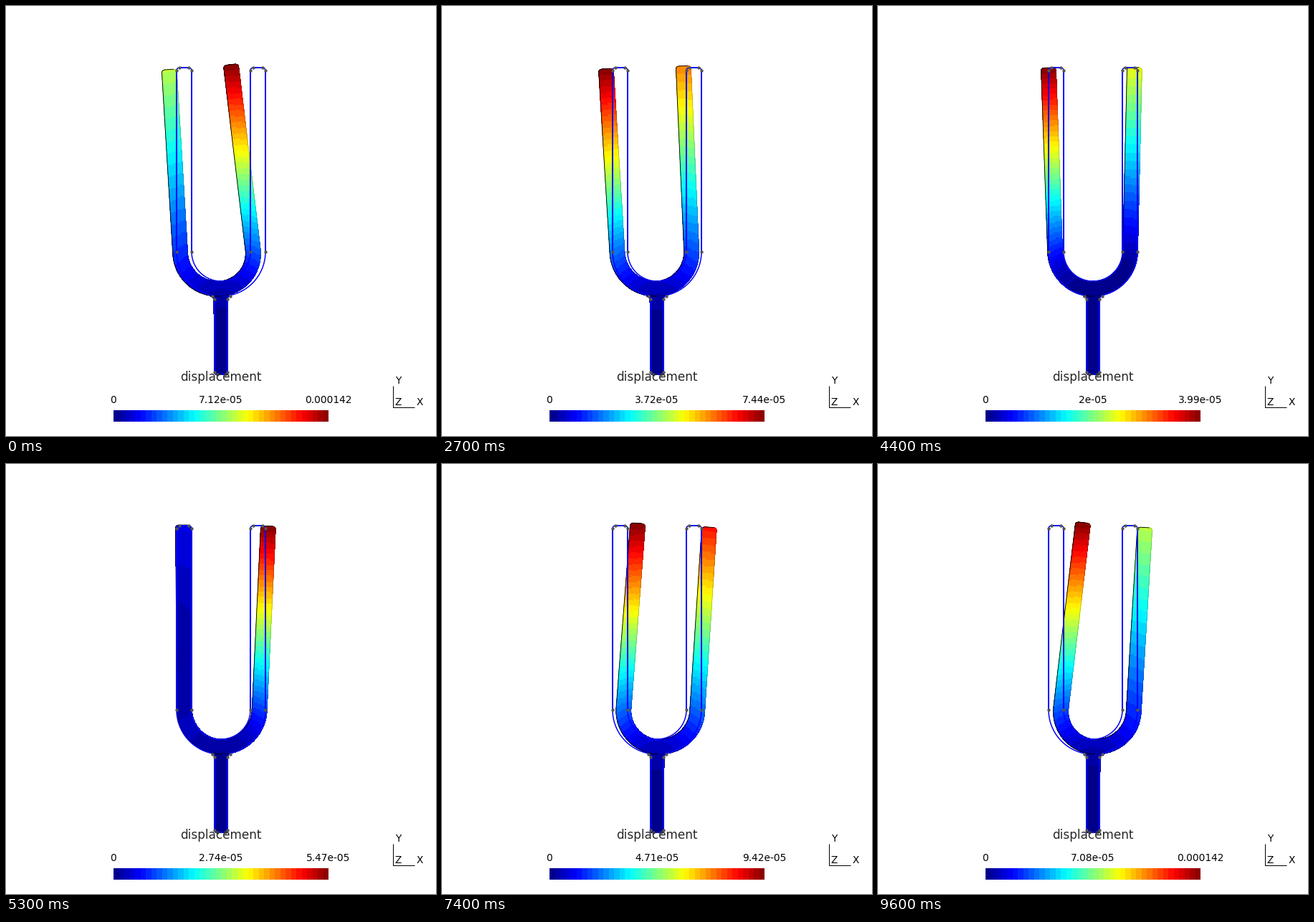
These frames come from a looping animation (600x600 px, 9700 ms). A matplotlib script:

```python
import numpy as np
import matplotlib.pyplot as plt
from matplotlib.animation import FuncAnimation
from matplotlib.collections import PolyCollection
from matplotlib.patches import Rectangle

SIZE, FRAMES, STEP = 600, 97, 100
PT = 0.72                      # points per pixel at 100 dpi
BANDS = 40
CX, CY = 300, 343              # centre of the bend
R_IN, R_OUT = 41, 62
R_MID, HALF = 51.5, 10.5
TIP, CORNER = 85.5, 4.2
STEM_HALF, STEM_END = 9.3, 515

# peak displacement read at a few moments
KEYS = [0, 18, 35, 53, 65, 74, 96]
PEAKS = np.array([14.24, 9.78, 6.32, 5.47, 7.57, 9.42, 14.16]) * 1e-5

plt.rcParams["font.family"] = "DejaVu Sans"
fig = plt.figure(figsize=(SIZE / 100, SIZE / 100), dpi=100, facecolor="white")
ax = fig.add_axes([0, 0, 1, 1])
ax.set_xlim(0, SIZE)
ax.set_ylim(SIZE, 0)
ax.axis("off")


def jet(level):
    """Banded blue-cyan-yellow-red ramp."""
    band = np.clip(np.floor(np.asarray(level) * BANDS), 0, BANDS - 1)
    s = 4 * (band + 0.5) / BANDS
    return np.clip(np.stack([1.5 - abs(s - c) for c in (3, 2, 1)], -1), 0, 1)


def round_inset(dist, radius):
    """How far an edge draws in at a distance from a rounded end."""
    d = np.clip(radius - dist, 0, radius)
    return radius - np.sqrt(radius ** 2 - d ** 2)


def integrate(omega, centre, start):
    """Displacement of a centre line whose sections rotate by omega."""
    step = np.diff(centre, axis=0)
    mid = (omega[1:] + omega[:-1])[:, None] / 2
    du = mid * np.stack([-step[:, 1], step[:, 0]], -1)
    return np.vstack([[start, 0], np.cumsum(du, axis=0) + [start, 0]])


def arm(side):
    """Rest grid of one prong and its lean and spread mode shapes."""
    phi = np.linspace(0, np.pi / 2, 45)
    ys = np.concatenate([np.linspace(CY, 91, 110)[1:], np.linspace(91, TIP, 9)[1:]])
    bend = np.stack([CX + side * R_MID * np.sin(phi), CY + R_MID * np.cos(phi)], -1)
    rod = np.stack([np.full_like(ys, CX + side * R_MID), ys], -1)
    centre = np.vstack([bend, rod])
    phi = np.concatenate([phi, np.full_like(ys, np.pi / 2)])
    normal = np.stack([side * np.sin(phi), np.cos(phi)], -1)

    half = np.full(len(phi), HALF)
    half[-len(ys):] -= round_inset(ys - TIP, CORNER)
    v = np.linspace(-1, 1, 8)
    offset = half[:, None, None] * v[None, :, None] * normal[:, None, :]
    turn = np.stack([-offset[..., 1], offset[..., 0]], -1)

    def mode(omega, start):
        shift = integrate(omega, centre, start)
        return shift[:, None, :] + omega[:, None, None] * turn

    lean = mode((0.045 + 0.045 * np.sin(phi)) / 29.4, 2 / 29.4)
    spread = mode(side * 0.0295 * np.sin(phi) ** 3 / 8.5, 0)
    return centre[:, None, :] + offset, lean, spread


def stem():
    ys = np.concatenate([np.linspace(399, 410, 12), np.linspace(411, 509, 30),
                         np.linspace(510, STEM_END, 9)])
    half = STEM_HALF - round_inset(STEM_END - ys, 4) + round_inset(ys - 405, 4)
    v = np.linspace(-1, 1, 4)
    x = CX + half[:, None] * v
    grid = np.stack([x, np.repeat(ys[:, None], len(v), 1)], -1)
    t = (STEM_END - ys) / 110
    lean = np.zeros_like(grid)
    lean[..., 0] = ((-0.6 + 0.3 * t + 1.8 * t ** 2) / 29.4)[:, None]
    return grid, lean, np.zeros_like(grid)


PARTS = [stem(), arm(-1), arm(1)]


def amplitudes(k):
    """Tip travel in pixels of the lean and spread modes."""
    lean = -29.4 * np.cos(np.pi * (k + 1.85) / 96)
    spread = 0.11 - 8.57 * np.cos(2 * np.pi * (k + 1.25) / 96)
    return lean, spread


def moves(k):
    a, b = amplitudes(k)
    return [a * lean + b * spread for _, lean, spread in PARTS]


def peak(k):
    return max(np.hypot(u[..., 0], u[..., 1]).max() for u in moves(k))


RATIO = PEAKS / np.array([peak(k) for k in KEYS])


def quads(grid):
    q = np.stack([grid[:-1, :-1], grid[1:, :-1], grid[1:, 1:], grid[:-1, 1:]], 2)
    return q.reshape(-1, 4, 2)


def cell_mean(m):
    return ((m[:-1, :-1] + m[1:, :-1] + m[1:, 1:] + m[:-1, 1:]) / 4).ravel()


def line(points, width, color="blue", z=4, **kw):
    x, y = np.asarray(points, float).T
    return ax.plot(x, y, color=color, lw=width * PT, zorder=z,
                   solid_capstyle="butt", **kw)[0]


def arc(cx, cy, r, start, end, n=40):
    a = np.radians(np.linspace(start, end, n))
    return np.stack([cx + r * np.cos(a), cy + r * np.sin(a)], -1)


def draw_rest_shape():
    dots = []
    for left, right in ((238, 259), (341, 362)):
        line([(left, CY), (left, 90)], 2)
        line([(right, CY), (right, 90)], 2)
        line([(left + 4, 86), (right - 4, 86)], 2)
        line(arc(left + 4, 90, 4, 180, 270, 8), 1.5)
        line(arc(right - 4, 90, 4, 270, 360, 8), 1.5)
        dots += [(left, 90), (left + 4, 86), (right - 4, 86), (right, 90),
                 (left, CY), (right, CY)]
    line(arc(CX, CY, R_IN, 0, 180, 90), 1.5)
    line(arc(CX, CY, R_OUT, 0, 78, 60), 1.5)
    line(arc(CX, CY, R_OUT, 102, 180, 60), 1.5)
    for side in (-1, 1):
        x = CX + side * 9
        line([(x, 409), (x, 510)], 2)
        line([(x + side * 4, 404.5), (x + side, 406), (x, 409)], 1.5)
        line([(x, 510), (x - side, 513), (x - side * 4, 514)], 1.5)
        dots += [(x + side * 3.5, 405), (x, 408.5), (x, 510.5), (x - side * 3.5, 514)]
    line([(295, 514), (305, 514)], 2)
    ax.plot(*np.array(dots).T, "o", ms=4.4 * PT, mew=0, color="#555555", zorder=5)


def label(x, y, s, px=13.8, color="black", ha="center"):
    return ax.text(x, y, s, fontsize=px * PT, color=color, ha=ha,
                   va="baseline", zorder=6)


def draw_legend():
    w = 300 / BANDS
    for i in range(BANDS):
        ax.add_patch(Rectangle((150 + i * w, 564), w, 16, lw=0, antialiased=False,
                               color=jet((i + 0.5) / BANDS)))
    label(300, 523, "displacement", 16.9, "#282828")
    label(150, 554, "0")
    line([(539.5, 530), (539.5, 559.5), (570, 559.5)], 1, "black")
    label(547, 527, "Y")
    label(547, 557, "Z")
    label(577.5, 557, "X")


draw_rest_shape()
draw_legend()
half_text = label(300, 554, "")
full_text = label(450, 554, "")
body = PolyCollection([], edgecolors="none", linewidths=0, antialiaseds=False, zorder=2)
ax.add_collection(body)
dark = [line([(0, 0)], 0.9, "black", 3) for _ in range(2)]
faint = [line([(0, 0)], 0.8, "black", 3, alpha=0.25) for _ in range(2)]


def update(k):
    shift = moves(k)
    sizes = [np.hypot(u[..., 0], u[..., 1]) for u in shift]
    top = max(m.max() for m in sizes)
    grids = [part[0] + u for part, u in zip(PARTS, shift)]
    body.set_verts(np.concatenate([quads(g) for g in grids]))
    body.set_facecolor(jet(np.concatenate([cell_mean(m) for m in sizes]) / top))

    for i, g in enumerate(grids[1:]):
        inner, outer = g[:, 0], g[:, -1]
        if i == 0:
            near, far, cap = outer, inner, g[-1, ::-1]
        else:
            near, far, cap = inner, outer, g[-1]
        dark[i].set_data(*np.vstack([near, cap]).T)
        faint[i].set_data(*far.T)

    value = top * np.interp(k, KEYS, RATIO)
    half_text.set_text(f"{value / 2:.3g}")
    full_text.set_text(f"{value:.3g}")
    return [body, *dark, *faint, half_text, full_text]


anim = FuncAnimation(fig, update, frames=FRAMES, interval=STEP,
                     repeat=True, repeat_delay=0, blit=False)
plt.show()
```
